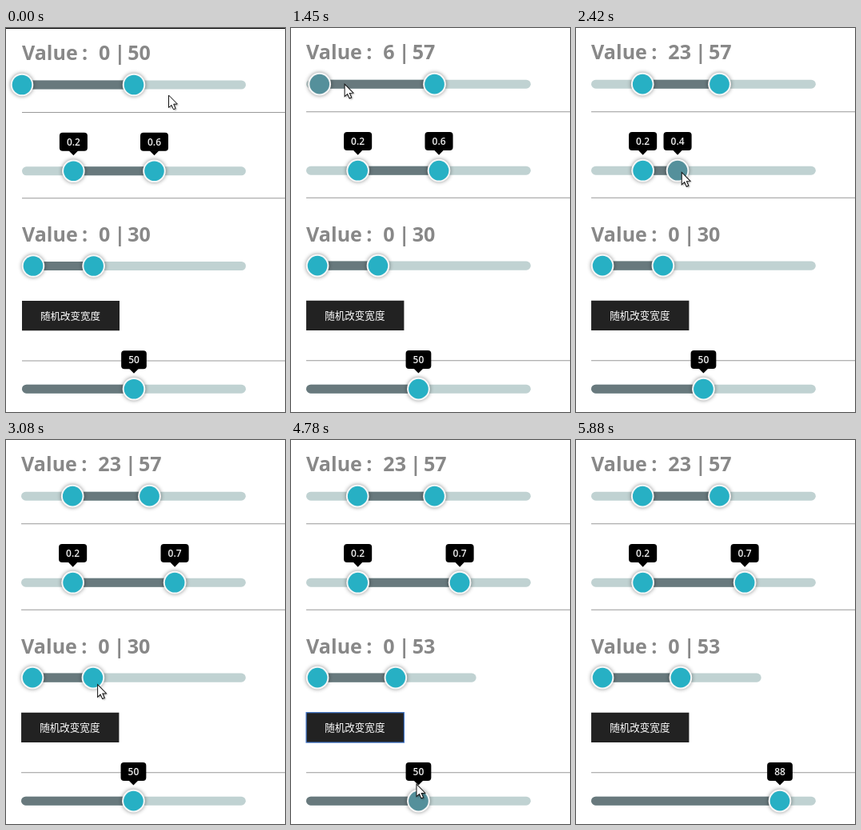
Recreate the animation shown at these times as an HTML page with a canvas. Size 349 by 480 pixels, loop 5.94 s.

```html
<!DOCTYPE html>
<html lang="zh">
<head>
<meta charset="utf-8">
<title>Range sliders</title>
<style>
html, body { margin: 0; height: 100%; overflow: hidden; background: #fff; }
canvas { display: block; }
</style>
</head>
<body>
<canvas id="stage" width="349" height="480"></canvas>
<script>
const ctx = document.getElementById('stage').getContext('2d');
const LOOP = 5940, STEP = 60.4;
const LEFT = 20, FULL = 280, SHORT = 212, INSET = 14;

// Each drag: pointer height, then [step, x] for grab, turn and release.
const drag = (y, ...points) => points.map(([n, x]) => [n, x, y]);
const high1 = drag(75, [4, 160], [11, 217], [16, 180]);
const low1 = drag(71, [22, 20], [25, 84], [29, 84]);
const high2 = drag(181, [36, 185.5], [39, 127.7], [46, 211.5]);
const high3 = drag(295, [64, 89.2], [70, 218], [75, 131.5]);
const single = drag(446, [80, 160], [84, 80], [91, 255.3]);
const path = [[0, 203, 84], ...high1, ...low1, ...high2, [54, 70, 364], [61, 70, 364], ...high3, ...single];

function pointerAt(n) {
  const i = path.findIndex(p => p[0] > n);
  if (i < 0) return path[path.length - 1].slice(1);
  const [a, ...from] = path[i - 1], [b, ...to] = path[i];
  const k = (n - a) / (b - a), s = k * k * (3 - 2 * k);
  return from.map((v, j) => v + (to[j] - v) * s);
}

// A knob trails the pointer by one step while held.
const knobX = (d, n) => pointerAt(Math.min(Math.max(n - 1, d[0][0]), d[2][0]))[0];
const hovered = (d, n) => n >= d[0][0] - 1 && n <= d[2][0] + 1;

function pill(x, y, w, h, r, color) {
  ctx.fillStyle = color;
  ctx.beginPath();
  ctx.roundRect(x, y, w, h, r);
  ctx.fill();
}

function label(text, x, y, font, color, align = 'left') {
  ctx.font = font;
  ctx.fillStyle = color;
  ctx.textAlign = align;
  ctx.fillText(text, x, y);
}

function track(y, width, from, to) {
  pill(LEFT, y - 5.5, width, 11, 5.5, '#c0d2d2');
  pill(from, y - 5.5, to - from, 11, 5.5, '#68797d');
}

function knob(x, y, active) {
  ctx.save();
  ctx.shadowColor = 'rgba(0,0,0,.45)';
  ctx.shadowBlur = 5;
  pill(x - 14.3, y - 14.3, 28.6, 28.6, 14.3, '#f8f8f8');
  ctx.restore();
  pill(x - 12.3, y - 12.3, 24.6, 24.6, 12.3, active ? '#55909b' : '#27b0c4');
}

function tip(x, y, text) {
  const font = '600 12px "Open Sans", "Noto Sans", sans-serif';
  ctx.font = font;
  const w = ctx.measureText(text).width + 18;
  pill(x - w / 2, y - 48, w, 23, 4, '#000');
  ctx.beginPath();
  ctx.moveTo(x - 6, y - 25.5);
  ctx.lineTo(x + 6, y - 25.5);
  ctx.lineTo(x, y - 19.5);
  ctx.fill();
  label(text, x, y - 32, font, '#eee', 'center');
}

function heading(y, low, high) {
  const font = 'bold 25px "Open Sans", "Noto Sans", sans-serif', gray = '#888';
  const a = String(Math.round(low));
  label('Value', 20, y, font, gray);
  label(':', 95, y, font, gray);
  label(a, 116, y, font, gray);
  const end = 116 + ctx.measureText(a).width;
  label('|', end + 12, y, font, gray, 'center');
  label(Math.round(high), end + 22, y, font, gray);
}

function arrow(x, y) {
  ctx.save();
  ctx.translate(x + 0.5, y);
  ctx.beginPath();
  [[0, 0], [0, 15.5], [3.5, 12.3], [6, 17.8], [8.6, 16.6], [6.2, 11.2], [10.8, 11]]
    .forEach(p => ctx.lineTo(...p));
  ctx.closePath();
  ctx.shadowColor = 'rgba(0,0,0,.4)';
  ctx.shadowBlur = 2;
  ctx.shadowOffsetX = ctx.shadowOffsetY = 1.5;
  ctx.fillStyle = '#fff';
  ctx.fill();
  ctx.shadowColor = 'transparent';
  ctx.lineWidth = 1;
  ctx.strokeStyle = '#111';
  ctx.stroke();
  ctx.restore();
}

function draw(n) {
  ctx.resetTransform();
  ctx.clearRect(0, 0, 349, 480);
  // The view grows by one pixel, first across, then down.
  const gx = n < 20 ? 0 : 1, gy = n < 21 ? 0 : 1;
  ctx.setTransform(1 + gx / 349, 0, 0, 1 + gy / 480, -gx, -gy);
  pill(0, 0, 349, 1, 0, '#000');
  for (const y of [105, 212.3, 415.5]) pill(LEFT, y, 340, 1, 0, '#999');

  const x1 = knobX(low1, n), x2 = knobX(high1, n);
  heading(40, (x1 - LEFT) / FULL * 100, (x2 - LEFT) / FULL * 100);
  track(71, FULL, x1, x2);
  knob(x1, 71, hovered(low1, n));
  knob(x2, 71, hovered(high1, n));

  const x3 = 84.4, x4 = knobX(high2, n);
  track(178.8, FULL, x3, x4);
  knob(x3, 178.8);
  knob(x4, 178.8, hovered(high2, n));
  for (const x of [x3, x4]) tip(x, 178.8, ((x - LEFT) / FULL).toFixed(1));

  const start = LEFT + INSET, width = n < 56 ? FULL : SHORT;
  const part = (knobX(high3, n) - start) / (SHORT - 2 * INSET);
  const x5 = start + part * (width - 2 * INSET);
  heading(267, 0, part * 100);
  track(297.5, width, start, x5);
  knob(start, 297.5);
  knob(x5, 297.5, hovered(high3, n));

  pill(LEFT, 341, 122, 37.3, 0, '#222');
  if (n >= 55 && n < 97) {
    ctx.strokeStyle = '#3f74c8';
    ctx.lineWidth = 1.2;
    ctx.strokeRect(LEFT, 341, 122, 37.3);
  }
  label('随机改变宽度', 80.6, 364.7, '500 12.5px "Noto Sans CJK SC", "Noto Sans CJK", sans-serif', '#fff', 'center');

  const x6 = knobX(single, n);
  track(451.2, FULL, LEFT, x6);
  knob(x6, 451.2, hovered(single, n));
  tip(x6, 451.2, Math.round((x6 - start) / (FULL - 2 * INSET) * 100));

  if (n < 93) arrow(...pointerAt(n));
}

function frame() {
  draw(Math.floor(performance.now() % LOOP / STEP));
  requestAnimationFrame(frame);
}
frame();
</script>
</body>
</html>
```
